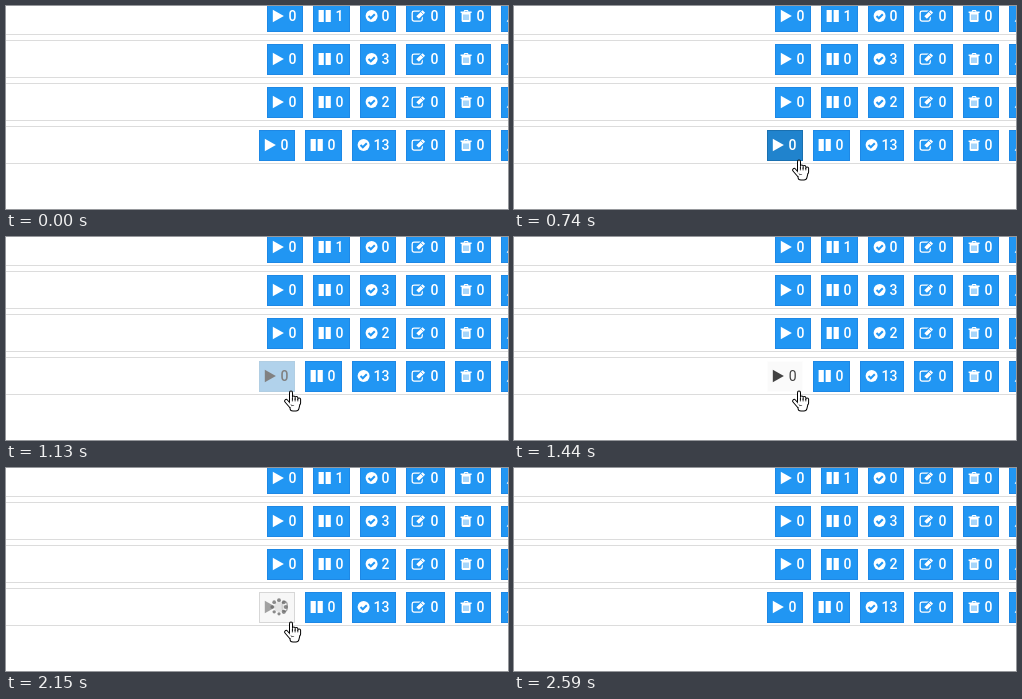
Write an HTML page with a canvas that moves like this. It is 502 px wide and 203 px high and loops after 2920 ms.

```html
<!DOCTYPE html>
<html lang="en">
<head>
<meta charset="utf-8">
<title>Task buttons</title>
<style>
  html, body { margin: 0; width: 100%; height: 100%; overflow: hidden; background: #fff; }
  canvas { display: block; width: 502px; height: 203px; }
</style>
</head>
<body>
<canvas id="stage" width="502" height="203"></canvas>
<script>
const ctx = document.getElementById('stage').getContext('2d');
const LOOP = 2920, TAU = Math.PI * 2;

// Colours are grey levels or [r, g, b]; spin is the spinner's opacity
const grey = v => [v, v, v];
const looks = {
  blue: { fill: [33, 150, 243], edge: [30, 136, 229], ink: grey(255), spin: 0 },
  dark: { fill: [32, 131, 205], edge: [26, 112, 176], ink: grey(255), spin: 0 },
  pale: { fill: grey(250), edge: grey(253), ink: grey(66), spin: 0 },
  held: { fill: grey(238), edge: grey(196), ink: grey(66), spin: 0 },
  busy: { fill: grey(250), edge: grey(221), ink: grey(66), spin: 1 }
};

// Each fade advances in visible steps
const fades = [
  { at: 660, steps: 2, to: 'dark' },
  { at: 1050, steps: 3, to: 'pale' },
  { at: 1900, steps: 1, to: 'held' },
  { at: 1980, steps: 4, to: 'busy' },
  { at: 2510, steps: 2, to: 'blue' }
];

const mix = (a, b, p) => a + (b - a) * p;
const mixRgb = (a, b, p) => a.map((v, i) => mix(v, b[i], p));
const rgb = c => `rgb(${c.map(Math.round)})`;
const stepped = (t, at, steps, ms) => Math.max(0, Math.min(1, (Math.floor((t - at) / ms) + 1) / steps));

function lookAt(t) {
  return fades.reduce((from, { at, steps, to }) => {
    const next = looks[to], p = stepped(t, at, steps, 80);
    return {
      fill: mixRgb(from.fill, next.fill, p),
      edge: mixRgb(from.edge, next.edge, p),
      ink: mixRgb(from.ink, next.ink, p),
      spin: mix(from.spin, next.spin, p)
    };
  }, looks.blue);
}

function path(...points) {
  ctx.beginPath();
  points.forEach(([x, y]) => ctx.lineTo(x, y));
}

function line(width, color, ...points) {
  ctx.lineWidth = width;
  ctx.strokeStyle = color;
  path(...points);
  ctx.stroke();
}

function dot(x, y, r) {
  ctx.beginPath();
  ctx.arc(x, y, r, 0, TAU);
  ctx.fill();
}

// Icons are drawn around y = 0 from x = 0
const icons = {
  play() {
    path([0.2, -6.2], [11.3, 0], [0.2, 6.2]);
    ctx.fill();
  },
  pause() {
    for (const x of [0, 7]) ctx.fillRect(x, -6, 5.2, 12);
  },
  check(ink, fill) {
    dot(6, 0, 6);
    line(2, fill, [2.9, 0], [5.2, 2.3], [9.2, -1.8]);
  },
  edit(ink, fill) {
    ctx.lineWidth = 1.3;
    ctx.strokeStyle = ink;
    ctx.beginPath();
    ctx.roundRect(0.6, -4.9, 10, 10, 1.8);
    ctx.stroke();
    line(6, fill, [6, 1.6], [13, -5.4]);
    line(3.6, ink, [6, 1.6], [12.2, -4.6]);
    line(0.7, fill, [9.3, -4.2], [11.8, -1.7]);
  },
  trash(ink, fill) {
    ctx.fillRect(0, -4.5, 11, 1.5);
    line(1.2, ink, [3.4, -4.3], [4.1, -5.5], [6.9, -5.5], [7.6, -4.3]);
    ctx.beginPath();
    ctx.roundRect(1, -3, 9, 9, [0, 0, 1.5, 1.5]);
    ctx.fill();
    ctx.fillStyle = fill;
    for (let x = 3; x < 8; x += 2) ctx.fillRect(x, -1.5, 0.8, 5.5);
  },
  warn() {
    path([0, 5.8], [7, -6.2], [14, 5.8]);
    ctx.fill();
  }
};

function button(x, y, w, icon, label, look = looks.blue) {
  const fill = rgb(look.fill), ink = rgb(look.ink);
  ctx.fillStyle = rgb(look.edge);
  ctx.fillRect(x, y, w, 31);
  ctx.fillStyle = fill;
  ctx.fillRect(x + 1, y + 1, w - 2, 29);
  ctx.save();
  ctx.globalAlpha = 1 - look.spin * 0.7;
  ctx.fillStyle = ink;
  // Light text on colour looks heavier than dark text on white
  ctx.font = `${look.ink[0] > 128 ? 500 : 400} 14px Roboto, sans-serif`;
  ctx.textAlign = 'right';
  ctx.fillText(label, x + w - 6.5, y + 20);
  ctx.translate(x + 5.6, y + 15);
  icons[icon](ink, fill);
  ctx.restore();
}

function spinner(x, y, alpha, t) {
  const turn = Math.floor(t / 80) / 8;
  ctx.save();
  ctx.globalAlpha = alpha;
  ctx.fillStyle = '#ddd';
  dot(x, y, 5);
  ctx.fillStyle = '#666';
  for (let i = 0; i < 8; i++) {
    const a = (i / 8 + turn) * TAU;
    dot(x + 6.8 * Math.cos(a), y + 6.8 * Math.sin(a), 1.6 + i * 0.08);
  }
  ctx.restore();
}

function hand(x, y) {
  ctx.save();
  ctx.translate(x, y);
  ctx.lineCap = ctx.lineJoin = 'round';
  // A black pass, then a slimmer white one, leaves an even outline
  for (const [color, rim] of [['#000', 1], ['#fff', 0]]) {
    line(2.2 + rim * 2, color, [2.2, 11], [6.5, 16]);
    line(5 + rim * 2, color, [8.3, 12.5], [13.3, 12.5], [12, 18], [9, 18]);
    [2.5, 7.5, 8, 9.5].forEach((top, i) =>
      line(2 + rim * 2, color, [7 + i * 2.7, top], [7 + i * 2.7, 13]));
  }
  for (let i = 0; i < 3; i++) line(0.8, '#000', [8.4 + i * 2.7, 8 + i * 0.5], [8.4 + i * 2.7, 11]);
  ctx.restore();
}

function pointer(t) {
  const leave = stepped(t, 2250, 3, 65);
  if (t < 70 || leave === 1) return;
  const away = Math.pow(1 - stepped(t, 142, 6, 71.6), 1.6);
  hand(278 + 46 * away + 33 * leave, 153 + 37 * away + 33 * leave);
}

const rows = [[1, 0], [0, 3], [0, 2], [0, 13]];

function draw(t) {
  ctx.fillStyle = '#fff';
  ctx.fillRect(0, 0, 502, 203);
  const look = lookAt(t);

  rows.forEach(([paused, done], i) => {
    const y = 43 * i - 5, wide = done > 9 ? 8 : 0;
    ctx.fillStyle = '#dcdcdc';
    ctx.fillRect(0, y - 4, 502, 1);
    ctx.fillRect(0, y + 33, 502, 1);
    button(261 - wide, y, 36, 'play', 0, i === 3 ? look : looks.blue);
    button(307 - wide, y, 37, 'pause', paused);
    button(354 - wide, y, 36 + wide, 'check', done);
    button(400, y, 39, 'edit', 0);
    button(449, y, 36, 'trash', 0);
    button(495, y, 39, 'warn', 0);
  });

  if (look.spin) spinner(273, 139, look.spin, t);
  pointer(t);
}

const start = performance.now();
function tick() {
  draw((performance.now() - start) % LOOP);
  requestAnimationFrame(tick);
}
tick();
</script>
</body>
</html>
```
